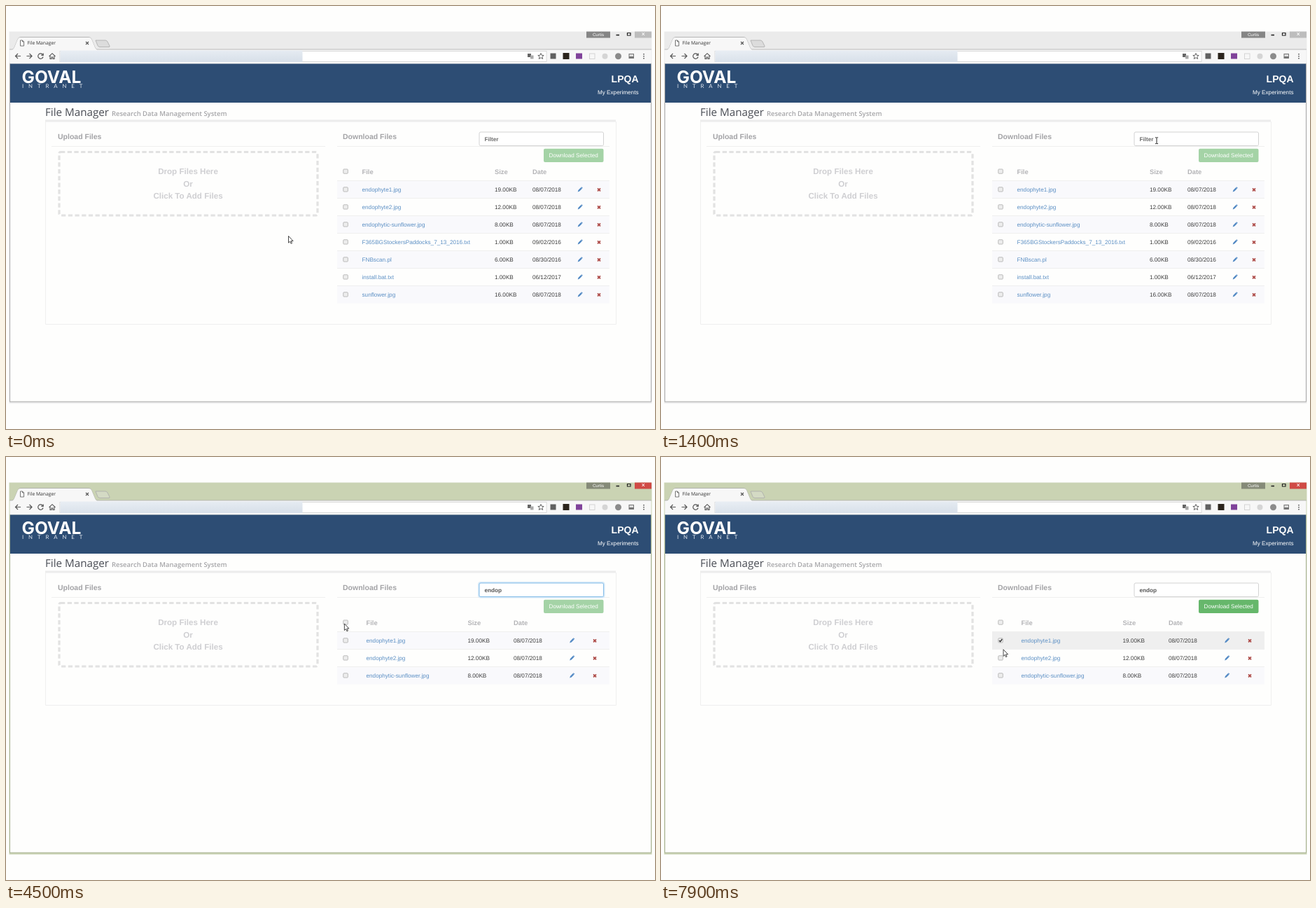
An HTML page that plays this animation: 927x604 px, repeating every 8 s.

```html
<!DOCTYPE html>
<html lang="en">
<head>
<meta charset="utf-8">
<title>File Manager</title>
<style>
html, body { margin: 0; width: 100%; height: 100%; overflow: hidden; background: #fefefd; }
svg { display: block; width: 927px; height: 604px; }
text { font-family: "Liberation Sans", Arial, sans-serif; text-rendering: geometricPrecision; white-space: pre; }
.b { font-weight: 700; }
.os { font-family: "Open Sans", sans-serif; }
.mid { text-anchor: middle; }
.end { text-anchor: end; }
.line { fill: none; stroke: #efefef; }
</style>
</head>
<body>
<svg viewBox="0 0 927 604">
  <defs>
    <linearGradient id="blur" x2=".25" y2="1">
      <stop offset="0" stop-color="#e9eef4"/><stop offset="1" stop-color="#d9e1ea"/>
    </linearGradient>
  </defs>
  <g id="chrome"></g>
  <g id="page"></g>
  <g id="live"></g>
  <g id="arrow"><path d="M0 0V9.6L2.2 7.6L3.6 10.8L5.1 10.1L3.7 7H6.6Z" fill="#fff" stroke="#333" stroke-width=".9" stroke-linejoin="round"/></g>
  <g id="beam"><path d="M-2 -4.2H-.6L0 -3.6L.6 -4.2H2M0 -3.6V4M-2 4.6H-.6L0 4L.6 4.6H2" fill="none" stroke="#222" stroke-width="1"/></g>
</svg>
<script>
const $ = id => document.getElementById(id);
const text = (s, x, y, size, fill, cls = "", extra = "") =>
  `<text x="${x}" y="${y}" font-size="${size}" fill="${fill}" class="${cls}" ${extra}>${s}</text>`;
const rect = (x, y, w, h, fill, extra = "") =>
  `<rect x="${x}" y="${y}" width="${w}" height="${h}" fill="${fill}" ${extra}/>`;
const path = (d, stroke, width = 1, fill = "none") =>
  `<path d="${d}" stroke="${stroke}" stroke-width="${width}" fill="${fill}"/>`;

const files = [
  ["endophyte1.jpg", "19.00KB", "08/07/2018"],
  ["endophyte2.jpg", "12.00KB", "08/07/2018"],
  ["endophytic-sunflower.jpg", "8.00KB", "08/07/2018"],
  ["F365BGStockersPaddocks_7_13_2016.txt", "1.00KB", "09/02/2016"],
  ["FNBscan.pl", "6.00KB", "08/30/2016"],
  ["install.bat.txt", "1.00KB", "06/12/2017"],
  ["sunflower.jpg", "16.00KB", "08/07/2018"]
];
const wideCols = [508.5, 698, 752, 820, 847];
const slimCols = [514.5, 659.5, 725, 808.5, 841];

const LOOP = 8000, FOCUS = 1600, BLUR = 5000, UNCHECK = 6800, CHECK_ONE = 7600;
const keys = [[2000, "e"], [2300, "en"], [2500, "end"], [2700, "endo"], [2900, "endop"]];
const filters = [[2100, "e"], [2500, "en"]];
const moves = [[0, 403.5, 328.5], [350, 403.5, 328.5], [1200, 708, 192], [3500, 708, 192],
  [4400, 483.3, 238], [5000, 484, 237.5], [7100, 484, 237.5], [7500, 484.5, 261],
  [7650, 484.5, 261], [7900, 489, 274.8], [8000, 489, 274.8]];

const latest = (list, t) => list.reduce((v, e) => t >= e[0] ? e : v, [FOCUS, ""]);

function pointer(t) {
  const i = moves.findIndex(m => m[0] > t), a = moves[i - 1], b = moves[i];
  const u = (t - a[0]) / (b[0] - a[0]), k = u * u * (3 - 2 * u);
  return [a[1] + (b[1] - a[1]) * k, a[2] + (b[2] - a[2]) * k];
}

function chrome(active) {
  const frame = active ? "#cad3b3" : "#ebebeb", ink = "#555", pale = "#d5d5d5";
  return rect(4.5, 36.5, 918, 531, frame) +
    rect(5.5, 82, 916, 483, "#fefefd", `stroke="${active ? "#a9b294" : "#a8a8a8"}"`) +
    rect(5.5, 62, 916, 20.5, "#f7f7f7") +
    path("M128 49H142Q144 49 145 51L148 57Q148.500 58.500 147 58.500H134Q132 58.500 131 56.500Z", "#aaa", .8, active ? "#d4dac4" : "#dcdcdc") +
    path("M5 62H9Q11 62 12 59L17 47Q18 44.500 21 44.500H118Q121 44.500 122 47L127 59Q128 62 130 62H922", "#aaa", .8, "none") +
    path("M9 62.5Q11 62 12 59L17 47Q18 45 21 45H118Q121 45 122 47L127 59Q128 62 130 62.5Z", "none", 0, "#f7f7f7") +
    path("M20.500 49H23.500L25.500 51V57H20.500ZM23.500 49V51H25.500", ink, .8, "#fff") +
    text("File Manager", 30.5, 55.3, 6.76, "#333", "os") +
    path("M114 51L118 55M118 51L114 55", ink, 1.1) +
    rect(829, 36.5, 34, 9, active ? "#858a78" : "#858585") +
    text("Curtis", 846, 42.6, 6.2, "#fff", "mid") +
    path("M871.500 41.500H876", "#222", 1.6) +
    path("M887.500 38.500H892V42H887.500Z", "#222", 1.2) +
    rect(898, 36.5, 24, 9, active ? "#d04a45" : "#bdbdbd") +
    path("M908.500 38L912 42M912 38L908.500 42", "#fff", 1) +
    // navigation buttons
    path("M21 71.500H13.500M17 68L13.500 71.500L17 75M29.500 71.500H37M33.500 68L37 71.500L33.500 75", ink, 1.2) +
    path("M52.500 69.500A3.700 3.700 0 1 0 53 72.500M53.200 67.500V70.300H50.300", ink, 1.2) +
    path("M61.500 71.800L66 67.700L70.500 71.800M63 71V75.500H65V73H67V75.500H69V71", ink, 1.1) +
    // address bar
    rect(77, 64.5, 695, 15, "#fff", 'stroke="#d2d2d2" stroke-width=".8"') +
    rect(77.5, 63.5, 346, 16.5, "url(#blur)") +
    rect(745, 68, 5, 5, "#666") + rect(749, 70.5, 4.5, 5, "#aaa") +
    path("M764 67.500L765.200 70.300L768.200 70.500L765.900 72.400L766.700 75.500L764 73.800L761.300 75.500L762.100 72.400L759.800 70.500L762.800 70.300Z", ink, .9) +
    rect(777.5, 67.5, 8, 8, "#606060") + rect(795.5, 67, 9, 9, "#2b241c") +
    rect(814, 67.5, 9, 8, "#80429a") +
    rect(833.5, 68, 7.5, 7.5, "none", `stroke="${pale}"`) +
    `<circle cx="855.5" cy="71.700" r="4" fill="${pale}"/><circle cx="874.500" cy="71.700" r="4.500" fill="#8b8b8b"/>` +
    rect(889.5, 68, 7.5, 7, "#777") + rect(890.5, 69, 5.5, 3, "#ddd") +
    path("M911 68V69.600M911 71V72.600M911 74V75.600", ink, 1.6);
}

const pageArt =
  rect(6, 82.5, 915, 55.5, "#2d4d74") +
  text("GOVAL", 22.5, 110, 24.5, "#fff", "b", 'style="font-family:Inter,sans-serif"') +
  text("INTRANET", 23, 117.2, 7.8, "#e4eaf1", "", 'style="font-family:Lato,sans-serif" letter-spacing="6.9"') +
  text("LPQA", 903.5, 109.2, 14, "#fff", "b end") +
  text("My Experiments", 903.5, 126.4, 8.18, "#fff", "end") +
  text("File Manager", 56, 156.8, 15.2, "#4a4d55", "os") +
  text("Research Data Management System", 151, 156.6, 9.47, "#a5a5a8", "os", 'font-weight="600"') +
  rect(56, 162.5, 815, 3, "#ececec") +
  text("Upload Files", 74, 190.2, 10.5, "#a3a3a6", "b") +
  text("Download Files", 481, 190.2, 10.5, "#a3a3a6", "b") +
  '<path class="line" d="M65 200.500H456M473 200.500H862"/>' +
  rect(76, 208.5, 369, 90.5, "none", 'rx="2" stroke="#e2e2e2" stroke-width="3.2" stroke-dasharray="6.300 3.400"') +
  ["Drop Files Here", "Or", "Click To Add Files"].map((s, i) =>
    text(s, 260, 240.4 + 17.5 * i, 11.6, "#cfcfd2", "b mid")).join("");

const box = (y, on) =>
  rect(481.8, y - 3.2, 6.5, 6.2, "#ededed", 'rx="1" stroke="#b5b5b5" stroke-width=".9"') +
  (on ? path(`M483 ${y}L484.600 ${y + 1.7}L487.300 ${y - 2}`, "#333", 1.4) : "");

const pencil = (x, y) =>
  path(`M${x - 3.3} ${y + 3.4}L${x - 2.6} ${y + .9}L${x + 1.2} ${y - 2.900}L${x + 2.900} ${y - 1.2}L${x - .9} ${y + 2.6}Z`, "none", 0, "#5289c4") +
  path(`M${x + 1.8} ${y - 3.4}L${x + 3.4} ${y - 1.8}`, "#5289c4", 1.1);

const cross = (x, y) => path(`M${x - 2} ${y - 2}l4 4m0 -4l-4 4`, "#ad4a47", 1.7);

function table(t, mx, my) {
  const query = latest(filters, t)[1];
  const rows = files.filter(f => f[0].includes(query));
  const cols = rows.length > 3 ? wideCols : slimCols;
  const all = t >= BLUR && t < UNCHECK;
  const bottom = 279.5 + 25 * rows.length;
  let out = `<path class="line" d="M56.500 165V${bottom}H871.500V165"/>` + box(236.2, all);
  ["File", "Size", "Date"].forEach((s, i) => out += text(s, cols[i], 240, 9.4, "#b4b4b7", "b"));
  rows.forEach((f, i) => {
    const top = 249.5 + 25 * i, y = top + 12.5;
    const hover = mx > 473 && mx < 862 && my >= top + .4 && my < top + 25.4;
    out += rect(473, top, 389, 25, hover ? "#efefef" : i % 2 ? "#fefefd" : "#f9f9fc") +
      `<path class="line" d="M473 ${top}H862"/>` +
      box(y, all || (i == 0 && t >= CHECK_ONE)) +
      f.map((s, c) => text(s, cols[c], y + 2.9, 8.18, c ? "#3c3c3c" : "#5b8fc4")).join("") +
      pencil(cols[3], y) + cross(cols[4], y + .3);
  });
  return out;
}

function controls(t) {
  const focus = t >= FOCUS && t < BLUR;
  const [since, typed] = latest(keys, t);
  const caretX = 684 + 8.18 * (typed ? .556 + .611 * (typed.length - 1) : 0) + .4;
  const ready = (t >= BLUR && t < UNCHECK) || t >= CHECK_ONE;
  return (focus ? rect(675, 179, 179.5, 21.5, "none", 'rx="3" stroke="#d6e9f8" stroke-width="2"') : "") +
    rect(676, 180, 177.5, 19.5, "#fff", `rx="2" stroke="${focus ? "#84bce8" : "#d3d3d3"}"`) +
    text(typed || "Filter", 683.5, 192.6, 8.18, typed ? "#555" : "#6d6d6d", "b") +
    (focus && (t - since) % 1000 < 500 ? path(`M${caretX} 185.500V194.500`, "#333", .8) : "") +
    rect(768, 203.7, 85.5, 19.3, ready ? "#66b76b" : "#a4d3a6", 'rx="2"') +
    text("Download Selected", 810.7, 216.3, 8.18, "#fff", "mid");
}

let shown = -1;
$("page").innerHTML = pageArt;

function draw(now) {
  const t = Math.floor(now % LOOP / 100) * 100;
  if (t !== shown) {
    shown = t;
    const [x, y] = pointer(t);
    const overInput = x > 676 && x < 854 && y > 180 && y < 200;
    $("chrome").innerHTML = chrome(t >= FOCUS);
    $("live").innerHTML = table(t, x, y) + controls(t);
    for (const [id, on] of [["arrow", !overInput], ["beam", overInput]]) {
      $(id).setAttribute("transform", `translate(${x} ${y})`);
      $(id).setAttribute("visibility", on ? "visible" : "hidden");
    }
  }
  requestAnimationFrame(draw);
}
draw(0);
</script>
</body>
</html>
```
